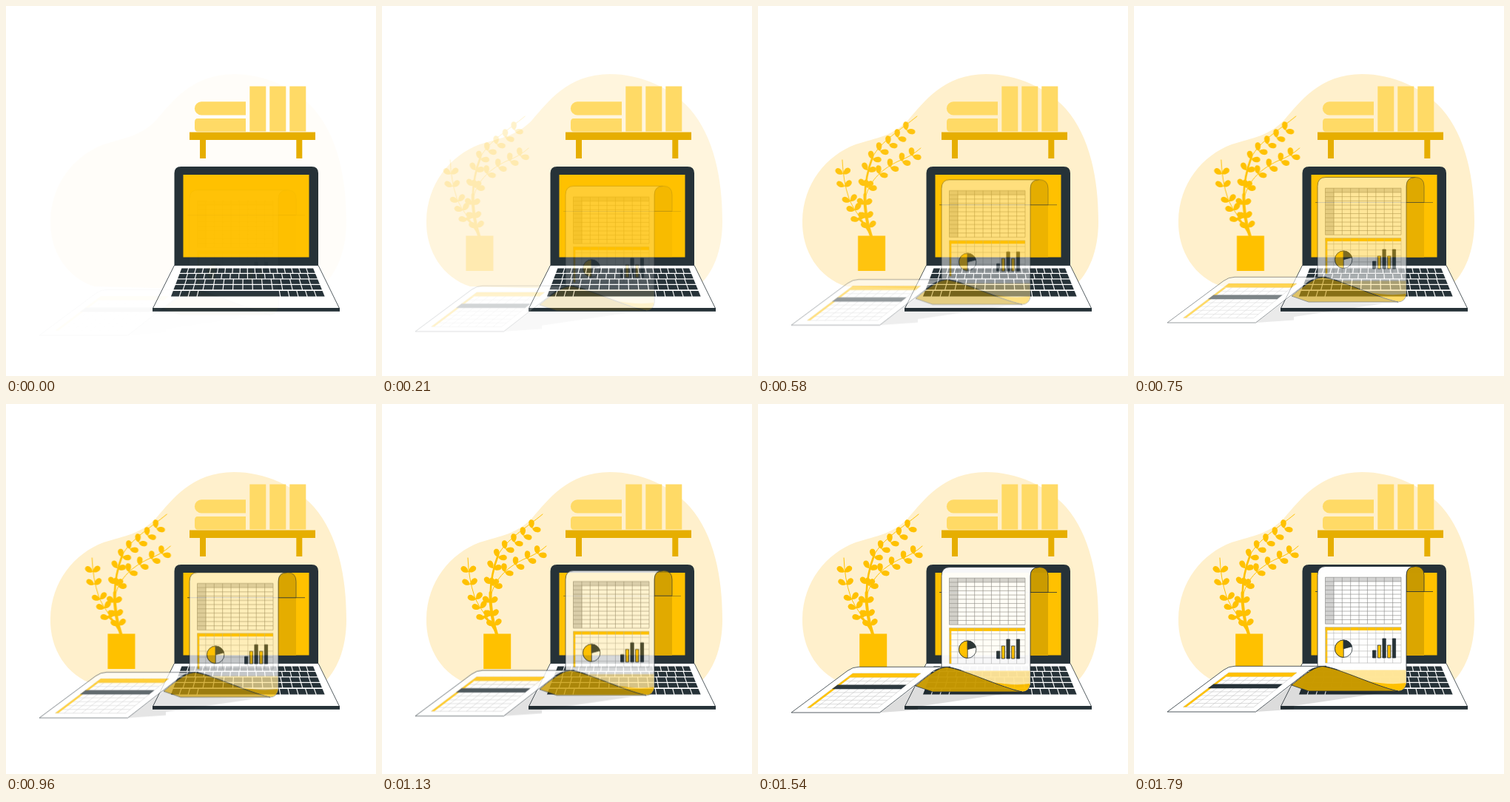
An HTML page that plays this animation: 500 px wide and 500 px high, repeating every 1830 ms.

```html
<!DOCTYPE html>
<html lang="en">
<head>
<meta charset="utf-8">
<title>Spreadsheet report</title>
<style>
  html, body { margin: 0; width: 100%; height: 100%; overflow: hidden; background: #fff; }
  svg { display: block; width: 100%; height: 100%; }
  .ink { fill: #263238; }
  .gold { fill: #ffc100; }
  .pale { fill: #ffda66; }
  .shelf { fill: #e6ae00; }
  .edge { stroke: #263238; stroke-width: .8; stroke-linejoin: round; }
  .line { fill: none; stroke: #263238; stroke-width: .8; }
</style>
</head>
<body>
<svg viewBox="0 0 500 500">
  <clipPath id="screen"><rect x="239.500" y="228" width="170" height="111.500"/></clipPath>

  <path id="blob" fill="#fff0cc" d="M60 290C61 240 92 202 132 187C160 178 182 176 203 154C224 130 251 92 308 92C350 92 391 111 416 139C449 177 460 234 460 291C460 331 447 362 427 379Q270 384 119 379C82 367 59 331 60 290Z"/>

  <g class="shelf">
    <rect x="248" y="170.500" width="170" height="10.500"/>
    <rect x="262" y="181" width="8" height="25"/>
    <rect x="392.300" y="181" width="8" height="25"/>
  </g>
  <g class="pale">
    <rect x="329.300" y="108.500" width="22" height="61"/>
    <rect x="356.300" y="108.500" width="22" height="61"/>
    <rect x="383.300" y="108.500" width="22" height="61"/>
    <path d="M324 129.300V147.500H264A9.100 9.100 0 0 1 264 129.300Z"/>
    <path d="M324 152V169.700H259Q255 169.700 255 165V157Q255 152 259 152Z"/>
  </g>

  <g id="plant">
    <rect class="gold" x="137.200" y="310.500" width="37" height="47.500"/>
    <g fill="none" stroke="#ffc100" stroke-linecap="round">
      <path d="M155 311C144 275 144 236 157 204C168 183 194 168 217 149"/>
      <path d="M147 260C153 233 173 219 191 210Q210 203 222 192"/>
      <path d="M155 311C146 290 133 280 125 260Q117 236 116 208"/>
      <path stroke-width="4" d="M155 311C149 293 146 275 146.500 255"/>
      <path stroke-width="2.600" d="M146.500 258Q147 230 157 204"/>
      <path stroke-width="2.400" d="M155 311Q149 297 138 287"/>
    </g>
    <g id="leaves" class="gold"></g>
  </g>

  <g id="laptop">
    <path class="ink" d="M227.500 351V226Q227.500 217 236.500 217H413Q422 217 422 226V351Z"/>
    <rect class="gold" x="239.500" y="228" width="170" height="111.500"/>
    <path class="edge" fill="#fff" d="M227.500 350.500H422L450.500 408.500H198.500Z"/>
    <rect class="ink" x="198" y="408" width="253" height="4.800"/>
    <g id="keys" class="ink"></g>
  </g>

  <g clip-path="url(#screen)">
    <g id="slot">
      <rect x="368" y="253.500" width="24" height="100" fill="#dba600"/>
      <path class="line" d="M245 253.500H404"/>
    </g>
  </g>

  <g id="paper">
    <path fill="#000" fill-opacity=".14" d="M165 416L216 412.500V408L338 390L236 388L213 380Z"/>
    <path class="edge" fill="#c99a00" d="M368 253.500V231.500Q368 219.500 380 219.500Q392 219.500 392 231.500V253.500Z"/>
    <path class="edge" fill="#fff" d="M380 219.500Q368 219.500 368 231.500V377Q367 387 357 388C325 381 280 358 258 354.500H248V231.500Q248 219.500 259 219.500Z"/>
    <path fill="#ffe699" d="M272 359.500H367.600V379H335C310 374 290 364 272 359.500Z"/>
    <path class="gold" d="M318 375Q345 380 367.600 377Q366.600 387 357 387.600Q337 383 318 375Z"/>
    <path class="edge" fill="#c99a00" d="M213 380L236 388H357C325 381 280 358 255 354.500Q243 354 213 380Z"/>
    <path class="edge" fill="#fff" d="M45 416L121 359.500Q128 354.300 136 354.300H260Q246 354 236 360.500L164.500 416Z"/>
    <g id="flat"></g>
    <g id="sheet"></g>
    <g id="chart"></g>
  </g>
</svg>

<script>
const $ = id => document.getElementById(id);

function add(parent, tag, attrs) {
  const el = document.createElementNS('http://www.w3.org/2000/svg', tag);
  for (const name in attrs) el.setAttribute(name, attrs[name]);
  return parent.appendChild(el);
}
const poly = (parent, points, attrs) => add(parent, 'polygon', { points: points.join(' '), ...attrs });
const rect = (parent, x, y, width, height, fill, extra) =>
  add(parent, 'rect', { x, y, width, height, fill, ...extra });
const strokes = (parent, d, stroke, width) =>
  add(parent, 'path', { d, fill: 'none', stroke, 'stroke-width': width });

const INK = '#263238', GOLD = '#ffc100';

// Leaf pairs: x, y, direction of the stem in degrees
const nodes = [
  [203, 168, -42], [191, 178, -40], [179, 187, -42], [167, 196, -45], [157, 207, -52],
  [150, 222, -65], [147, 243, -78], [146, 268, -88], [148, 286, -95], [152, 299, -98],
  [211, 203, -45], [197, 210, -38], [181, 218, -38], [166, 227, -42], [151, 246, -55],
  [117, 227, -92], [119, 244, -95], [127, 264, -105], [133, 276, -108], [139, 289, -115]
];
for (const [x, y, turn] of nodes) {
  for (const spread of [-54, 54]) {
    add($('leaves'), 'path', {
      d: 'M0 0C2-3 4-4 7-4C11-4 13-1 11 2C9 4.500 4 4 0 0Z',
      transform: `translate(${x} ${y}) rotate(${turn + spread}) scale(1 ${spread < 0 ? 1 : -1})`
    });
  }
}

// Keyboard in perspective
const keyX = (u, y) => {
  const left = 237 - (y - 354) * .38, right = 415.500 + (y - 354) * .41;
  return left + (right - left) * u;
};
function key(u0, u1, top, bottom) {
  poly($('keys'), [
    keyX(u0, top) + .6, top, keyX(u1, top) - .6, top,
    keyX(u1, bottom) - .6, bottom, keyX(u0, bottom) + .6, bottom
  ]);
}
[18, 16, 15, 15].forEach((count, row) => {
  const top = 354.500 + row * 7.500;
  for (let i = 0; i < count; i++) key(i / count, (i + 1) / count, top, top + 6.300);
});
for (let i = 0; i < 3; i++) key(i * .057, (i + 1) * .057, 385, 392.500);
key(.171, .71, 385, 392.500);
for (let i = 0; i < 5; i++) key(.71 + i * .058, .71 + (i + 1) * .058, 385, 392.500);

// Table on the page lying down
const flatX = (u, y) => {
  const left = 128 - (y - 363) * 1.320, right = 220 - (y - 363) * 1.250;
  return left + (right - left) * u;
};
function band(u0, u1, top, bottom, fill) {
  poly($('flat'), [
    flatX(u0, top), top, flatX(u1, top), top,
    flatX(u1, bottom), bottom, flatX(u0, bottom), bottom
  ], { fill });
}
let flatLines = '';
for (let i = 0; i <= 9; i++) {
  const y = 363 + i * 5.180;
  flatLines += `M${flatX(0, y)} ${y}H${flatX(1, y)}`;
}
for (let i = 0; i <= 8; i++) flatLines += `M${flatX(i / 8, 363)} 363L${flatX(i / 8, 409.600)} 409.600`;
strokes($('flat'), flatLines, '#c4c4c4', .6);
band(0, 1, 363, 368.500, GOLD);
band(0, .045, 368.500, 409.600, GOLD);
band(0, 1, 378.500, 384.300, INK);

function grid(parent, x, y, w, h, cols, rows, color, width) {
  let d = '';
  for (let i = 0; i <= cols; i++) d += `M${x + w * i / cols} ${y}v${h}`;
  for (let i = 0; i <= rows; i++) d += `M${x} ${y + h * i / rows}h${w}`;
  strokes(parent, d, color, width);
}

// Upper table
rect($('sheet'), 258.500, 234.200, 102.500, 5.700, '#d2d2d2');
rect($('sheet'), 258.500, 234.200, 12, 63, '#d2d2d2');
grid($('sheet'), 258.500, 234.200, 102.500, 63, 9, 11, '#858585', .6);

// Lower table with pie and bars
const chart = $('chart');
rect(chart, 258.500, 301.600, 102.500, 4.300, GOLD);
rect(chart, 258.500, 301.600, 2.800, 48.400, GOLD);
grid(chart, 258.500, 301.600, 102.500, 48.400, 9, 6, '#b4b4b4', .6);
add(chart, 'circle', { cx: 283.200, cy: 330.700, r: 11.700, fill: '#fff', class: 'edge' });
add(chart, 'path', { d: 'M283.200 330.700V342.400A11.700 11.700 0 0 1 283.200 319Z', fill: GOLD, class: 'edge' });
add(chart, 'path', { d: 'M283.200 330.700V319A11.700 11.700 0 0 1 294.500 327.700Z', fill: INK, class: 'edge' });
[10, 17, 26, 17, 26].forEach((h, i) =>
  rect(chart, 322.500 + i * 6.700, 343 - h, 4.300, h, i % 2 ? GOLD : INK, { class: 'edge' }));

// Entrances, scrubbed by the clock
const LOOP = 1830, STEPS = 44, STEP = LOOP / STEPS;

function enter(id, from, duration, easing) {
  const move = $(id).animate(
    [{ opacity: 0, transform: from }, { opacity: 1, transform: 'translate(0px, 0px)' }],
    { duration, easing, fill: 'both' }
  );
  move.pause();
  return move;
}
const moves = [
  enter('blob', 'translate(0px, 0px)', 500, 'ease-out'),
  enter('plant', 'translate(-30px, 0px)', 1000, 'cubic-bezier(.36, -.01, .5, 1.38)'),
  enter('slot', 'translate(0px, 30px)', LOOP, 'ease-out'),
  enter('paper', 'translate(0px, 30px)', LOOP, 'ease-out')
];

const start = performance.now();
function draw() {
  const time = (performance.now() - start) % LOOP;
  const step = Math.min(STEPS - 1, Math.floor((time + 3) / STEP));
  for (const move of moves) move.currentTime = (step + .75) * STEP;
  requestAnimationFrame(draw);
}
draw();
</script>
</body>
</html>
```
